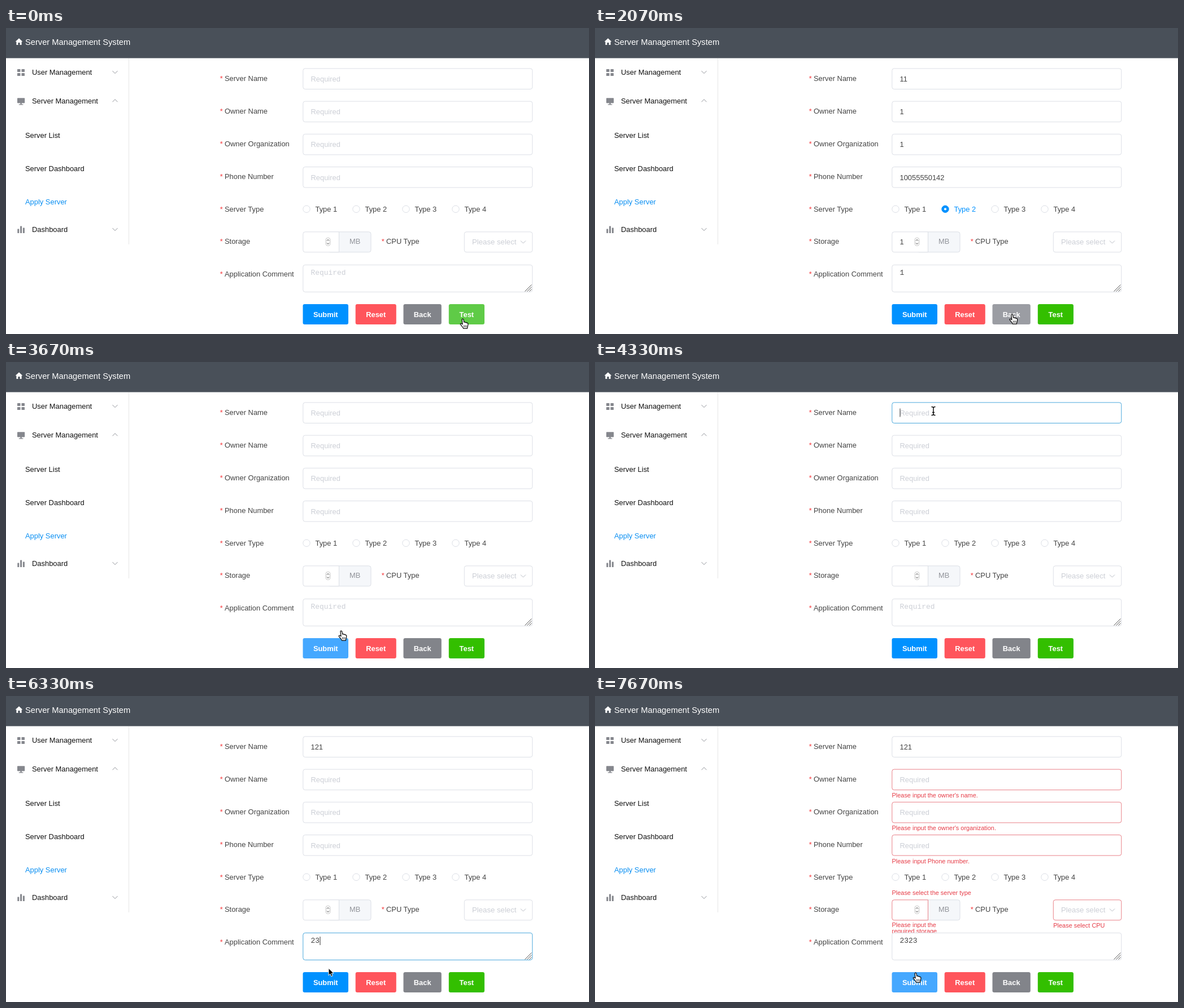
Animation of 1032x543 px, one loop 8000 ms. Source, as an HTML page:

```html
<!DOCTYPE html>
<html lang="en">
<head>
<meta charset="utf-8">
<title>Server Management System</title>
<style>
html, body { margin: 0; width: 100%; height: 100%; overflow: hidden; background: #fff; }
svg { display: block; width: 100%; height: 100%; }
text { font: 12.92px "Liberation Sans", Arial, sans-serif; white-space: pre; }
.bold { font-weight: 700; }
.mono { font-family: "Liberation Mono", monospace; }
.err { font-size: 10.95px; }
</style>
</head>
<body>
<svg id="stage" viewBox="0 0 1032 543" xmlns="http://www.w3.org/2000/svg"></svg>
<script>
const NS = 'http://www.w3.org/2000/svg', LOOP = 8000;
const stage = document.getElementById('stage');
const BLUE = '#0091ff', INK = '#444444', HINT = '#cccfd6', LINE = '#dcdfe6',
      FOCUS = '#4aa8dc', HOVER = '#c0c4cc', RED = '#e98088', GREY = '#909399';

function add(tag, attrs, parent = stage) {
  const el = document.createElementNS(NS, tag);
  for (const k in attrs) el.setAttribute(k, attrs[k]);
  parent.appendChild(el);
  return el;
}
function label(str, x, y, fill = INK, attrs = {}, parent = stage) {
  const el = add('text', { x, y, fill, ...attrs }, parent);
  el.textContent = str;
  return el;
}
const box = (x, y, w, h, fill, stroke, rx = 3.7) =>
  add('rect', { x, y, width: w, height: h, rx, fill, stroke: stroke || 'none' });
const line = (d, stroke, width = 1) =>
  add('path', { d, stroke, 'stroke-width': width, fill: 'none' });
const set = (el, k, v) => el.setAttribute(k, v);
const show = (el, on) => set(el, 'visibility', on ? 'visible' : 'hidden');

const clamp = v => Math.max(0, Math.min(1, v));
const ramp = (t, a, d) => clamp((t - a) / d);
const during = (t, a, b, d = 100) => ramp(t, a, d) - ramp(t, b, d);
const inside = (t, a, b) => t >= a && t < b;
function mix(a, b, k) {
  const part = (c, i) => parseInt(c.slice(i, i + 2), 16);
  return 'rgb(' + [1, 3, 5].map(i => Math.round(part(a, i) + (part(b, i) - part(a, i)) * k)) + ')';
}

// Header
add('rect', { width: 1032, height: 53.5, fill: '#495059' });
add('path', { d: 'M23 18.2 L29.4 24.2 H27.6 V30 H24.6 V26 H21.4 V30 H18.4 V24.2 H16.6Z', fill: '#fff' });
label('Server Management System', 34, 29.8, '#fff', { style: 'font-size:14.7px' });

// Sidebar
line('M217.5 54V384', '#e6e6e6');
const chevron = (x, y, up, c = GREY) =>
  line(`M${x - 4.5} ${y + (up ? 2.2 : -2.2)}l4.5 ${up ? -4.5 : 4.5}l4.5 ${up ? 4.5 : -4.5}`, c);
for (const [x, y] of [[20, 73], [27.5, 73], [20, 80], [27.5, 80]])
  box(x, y, 5.5, 5, '#85878d', null, 0.5);
box(20, 124.2, 13.2, 9, '#85878d', null, 0.8);
add('path', { d: 'M25.4 133h2.4v2.2h2.6v1.3h-7.6v-1.3h2.6z', fill: '#85878d' });
for (const [x, y] of [[20.3, 356.5], [25.1, 351.5], [29.9, 354.5]])
  box(x, y, 3, 364 - y, '#85878d', null, 0.5);
label('User Management', 46, 82.8, '#111');
label('Server Management', 46, 134.4, '#111');
label('Dashboard', 46, 361.9, '#111');
label('Server List', 34, 195.3, '#111');
label('Server Dashboard', 34, 254.4, '#111');
label('Apply Server', 34, 312.9, '#0a8ff2');
chevron(193, 78.3, false);
chevron(193, 129, true);
chevron(193, 357.3, false);

// Form labels
function required(str, x, y) {
  label('*', x - 8.3, y, '#f5383b');
  label(str, x, y);
}
['Server Name', 'Owner Name', 'Owner Organization', 'Phone Number', 'Server Type', 'Storage', 'Application Comment']
  .forEach((s, i) => required(s, 387, 93.6 + [0, 58.2, 116.4, 174.6, 232.5, 289.8, 347.5][i]));
required('CPU Type', 673, 383.4);

// Error messages unfold downwards
const errors = [
  [525.5, 170, ["Please input the owner's name."]],
  [525.5, 228, ["Please input the owner's organization."]],
  [525.5, 286.7, ['Please input Phone number.']],
  [525.5, 343, ['Please select the server type']],
  [525.5, 400.3, ['Please input the', 'required storage']],
  [811.3, 401, ['Please select CPU']]
].map(([x, y, rows]) => {
  const g = add('g', {});
  rows.forEach((s, i) => label(s, x, 10 + i * 11, '#e63c47', { class: 'err' }, g));
  return { g, y };
});

// Text fields
const fills = ['11', '1', '1', '10055550142'];
const fields = fills.map((fill, i) => {
  const y = 71.9 + i * 58.2;
  return { fill, box: box(525.8, y, 406, 36.6, '#fff', LINE), text: label('', 539.5, y + 23.1) };
});

// Radios
const radios = [0, 1, 2, 3].map(i => {
  const x = 532 + i * 88;
  return {
    ring: add('circle', { cx: x, cy: 321.3, r: 6.2, fill: '#fff', stroke: LINE }),
    dot: add('circle', { cx: x, cy: 321.3, r: 0, fill: '#fff' }),
    text: label('Type ' + (i + 1), x + 15.5, 326)
  };
});

// Storage and CPU
box(570, 361.8, 76, 36, '#f5f7fa', LINE);
const storage = add('path', { d: 'M529.5 361.8H589.5V397.8H529.5a3.7 3.7 0 0 1-3.7-3.7V365.5a3.7 3.7 0 0 1 3.7-3.7Z', fill: '#fff' });
const amount = label('', 539.5, 384.2);
label('MB', 608, 383.3, GREY);
box(566.2, 372.3, 7.6, 14.2, '#fff', '#c4c4c4', 3.6);
line('M568 377.6l2-2.2l2 2.2M568 381.4l2 2.2l2-2.2', '#444');
const cpu = box(811.3, 361.8, 120.5, 36, '#fff', LINE);
label('Please select', 825, 384.2, HINT, { style: 'font-size:13.2px' });
chevron(915.5, 379.7, false, '#b9bdc5');

// Comment
const comment = box(525.8, 420.4, 406, 48, '#fff', LINE);
const note = label('', 539.5, 438.4, INK, { class: 'mono' });
line('M918.5 467.5L930.5 455.5M922.5 467.5L930.5 459.5M926.5 467.5L930.5 463.5', '#555');

const caret = add('rect', { width: 1, height: 15, fill: '#333' });

// Buttons: hover and press windows
const buttons = [
  { x: 525.5, w: 80.5, name: 'Submit', base: BLUE, light: '#45a8ff', dark: '#0083e6', over: [[3470, 3690], [6470, 9000]], press: 6930 },
  { x: 618.7, w: 72.1, name: 'Reset', base: '#ff555c', light: '#ff777d', dark: '#e64c53', over: [[2270, 3400]], press: 2930 },
  { x: 703.5, w: 67.3, name: 'Back', base: '#82848a', light: '#9b9da3', dark: '#75777c', over: [[1800, 2270]] },
  { x: 783.8, w: 63.2, name: 'Test', base: '#33bf00', light: '#5fcb47', dark: '#2eac00', over: [[-200, 1330]], press: 70 }
];
for (const b of buttons) {
  b.box = box(b.x, 490, b.w, 36, b.base, null, 3.2);
  label(b.name, b.x + b.w / 2, 512.8, '#fff', { class: 'bold', 'text-anchor': 'middle' });
}
add('rect', { x: 820, y: 541, width: 212, height: 2, fill: '#fbfbfb' });

// Pointers
const pointers = { hand: add('g', {}), beam: add('g', {}), arrow: add('g', {}) };
add('path', {
  d: 'M-3.8-7C-4.4-9.2-1.6-9.4-1.1-7.4L-.2-2.8C.2-3.7 2-3.4 2.3-2.2C2.9-3 4.4-2.6 4.7-1.4C5.5-2 6.8-1.3 6.9 0C7.2 3 5.8 4.6 5.5 8.2H-1.4C-2.2 5.6-5.4 3-6.6.8C-7.1-.7-5.2-1.6-2.9.9Z',
  fill: '#fff', stroke: '#000', 'stroke-width': 1.2, 'stroke-linejoin': 'round'
}, pointers.hand);
add('path', { d: 'M-.4 2.4V6M1.8 2.4V6M4 2.4V6', stroke: '#000', 'stroke-width': 0.8 }, pointers.hand);
for (const [c, w] of [['#fff', 3], ['#000', 1.4]])
  add('path', { d: 'M-3.5-7.5Q0-7.5 0-5.5Q0-7.5 3.5-7.5M0-6V6M-3.5 7.5Q0 7.5 0 5.5Q0 7.5 3.5 7.5M-2 2.5H2', stroke: c, 'stroke-width': w, fill: 'none' }, pointers.beam);
add('path', {
  d: 'M0 0V12.6L2.9 9.9L4.8 14.4L7.2 13.4L5.3 9H9.2Z',
  fill: '#000', stroke: '#fff', 'stroke-width': 1, 'stroke-linejoin': 'round'
}, pointers.arrow);

// time, x, y, pointer from then on
const path = [
  [0, 811, 525, 'hand'], [1000, 811, 525, 'hand'], [1130, 810.5, 524, 'hand'], [1270, 808, 523.5, 'hand'],
  [1470, 754, 522, 'hand'], [1800, 754, 522, 'hand'], [2070, 741, 517, 'hand'], [2400, 668, 518, 'hand'],
  [3330, 668, 518, 'hand'], [3500, 602, 512, 'hand'], [3670, 596, 486, 'hand'], [3720, 590, 480, 'arrow'],
  [4130, 455, 446, 'arrow'], [4200, 455, 446, 'arrow'], [4270, 599, 92, 'beam'], [4330, 599, 87, 'beam'],
  [4470, 599, 88, ''], [5070, 598, 91, 'beam'], [5170, 520, 170, 'arrow'], [5270, 455, 300, 'arrow'],
  [5370, 500, 440, 'arrow'], [5470, 602, 475, 'arrow'], [5650, 602, 475, 'arrow'], [5660, 589, 440, 'beam'],
  [5930, 589, 440, ''], [6200, 588, 446, 'beam'], [6290, 576, 472, 'arrow'], [6330, 571, 483, 'arrow'],
  [6400, 570, 494, 'hand'], [6470, 570, 500, 'hand'], [8000, 570, 500, 'hand']
];

// Text typed so far, from [time, text] pairs
const typed = (t, steps) => steps.reduce((s, [at, v]) => (t >= at ? v : s), '');

function setText(el, value, hint) {
  el.textContent = value || hint;
  set(el, 'fill', value ? INK : HINT);
}

function movePointer(t) {
  let i = 0;
  while (i < path.length - 2 && t >= path[i + 1][0]) i++;
  const [a, b] = [path[i], path[i + 1]];
  const k = ramp(t, a[0], b[0] - a[0]);
  const at = `translate(${a[1] + (b[1] - a[1]) * k} ${a[2] + (b[2] - a[2]) * k})`;
  for (const name in pointers) {
    show(pointers[name], name === a[3]);
    set(pointers[name], 'transform', at);
  }
}

function draw(t) {
  const filled = inside(t, 200, 3000);
  const name = typed(t, [[4470, '1'], [4670, '12'], [4870, '121']]);
  const memo = typed(t, [[5930, '2'], [6070, '23'], [6400, '232'], [6470, '2323']]);
  const bad = ramp(t, 7070, 200);

  fields.forEach((f, i) => {
    setText(f.text, filled ? f.fill : i ? '' : name, 'Required');
    set(f.box, 'stroke', i ? mix(LINE, RED, bad) : mix(LINE, FOCUS, during(t, 4230, 5730)));
  });
  setText(note, filled ? '1' : memo, 'Required');
  amount.textContent = filled ? '1' : '';
  set(storage, 'stroke', mix(LINE, RED, bad));
  set(cpu, 'stroke', mix(LINE, RED, bad));
  set(comment, 'stroke', t < 5730
    ? mix(LINE, HOVER, ramp(t, 5600, 70))
    : mix(t < 6600 ? HOVER : LINE, FOCUS, during(t, 5730, 6930)));

  const on = during(t, 200, 3000, 150);
  set(radios[1].ring, 'fill', mix('#ffffff', BLUE, on));
  set(radios[1].ring, 'stroke', mix(LINE, BLUE, on));
  set(radios[1].dot, 'r', 2.1 * on);
  set(radios[1].text, 'fill', mix(INK, BLUE, on));

  const inName = inside(t, 4260, 5300), inMemo = inside(t, 5740, 6930);
  show(caret, inName || inMemo);
  set(caret, 'x', inMemo ? 540 + memo.length * 7.75 : 539.5 + name.length * 7.19);
  set(caret, 'y', inMemo ? 427 : 82.5);

  const open = 1 - Math.pow(1 - ramp(t, 7070, 300), 3);
  for (const { g, y } of errors) {
    set(g, 'opacity', open);
    set(g, 'transform', `translate(0 ${y}) scale(1 ${open})`);
  }

  for (const b of buttons) {
    const hot = b.over.reduce((s, [from, to]) => s + during(t, from, to), 0);
    const down = b.press !== undefined && inside(t, b.press, b.press + 130);
    set(b.box, 'fill', down ? b.dark : mix(b.base, b.light, hot));
  }
  movePointer(t);
}

const start = performance.now();
function tick(now) {
  draw(Math.max(0, now - start) % LOOP);
  requestAnimationFrame(tick);
}
draw(0);
requestAnimationFrame(tick);
</script>
</body>
</html>
```
